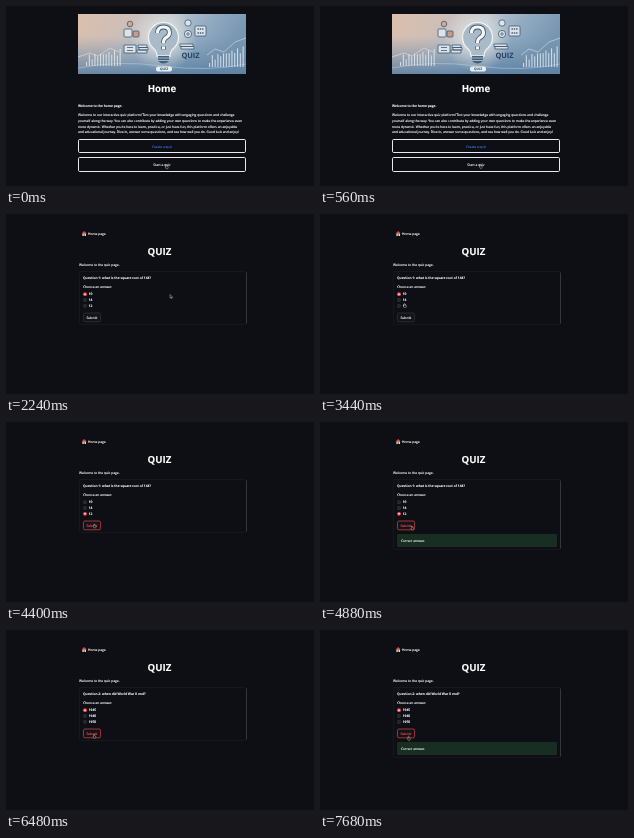
Recreate the animation shown at these times as an HTML page. Size 308 by 180 pixels, loop 8 s.

```html
<!DOCTYPE html>
<html lang="en">
<head>
<meta charset="utf-8">
<title>Quiz</title>
<style>
html, body { margin: 0; width: 100%; height: 100%; overflow: hidden; background: #0d0f14; }
svg { display: block; width: 100%; height: 100%; }
text { font: 500 3.3px "Open Sans", "Noto Sans", sans-serif; fill: #fff; stroke: #fff; stroke-width: .12; text-rendering: geometricPrecision; }
.title { font-size: 9.7px; font-weight: 700; text-anchor: middle; }
.bold { font-weight: 600; }
.mid { text-anchor: middle; }
.dark { fill: #24415f; stroke: none; font-weight: 700; }
</style>
</head>
<body>
<svg viewBox="0 0 308 180">
  <defs>
    <linearGradient id="sky" x2="1" y2=".25">
      <stop offset="0" stop-color="#dcbfad"/>
      <stop offset=".3" stop-color="#cdbfb8"/>
      <stop offset=".55" stop-color="#b7c3cd"/>
      <stop offset=".78" stop-color="#8fa9c0"/>
      <stop offset="1" stop-color="#7896b2"/>
    </linearGradient>
    <linearGradient id="haze" x2="0" y2="1">
      <stop offset="0" stop-color="#7391ad" stop-opacity="0"/>
      <stop offset="1" stop-color="#5b80a2" stop-opacity=".9"/>
    </linearGradient>
    <radialGradient id="glow">
      <stop offset="0" stop-color="#f4efe6" stop-opacity=".9"/>
      <stop offset="1" stop-color="#eee9e2" stop-opacity="0"/>
    </radialGradient>
    <clipPath id="frame"><rect x="72" y="8" width="168" height="60"/></clipPath>
  </defs>
  <rect width="308" height="180" fill="#0d0f14"/>

  <g id="home">
    <g clip-path="url(#frame)">
      <rect x="72" y="8" width="168" height="60" fill="url(#sky)"/>
      <rect x="72" y="30" width="168" height="38" fill="url(#haze)"/>
      <circle cx="157" cy="32" r="34" fill="url(#glow)"/>
      <g id="bars" fill="#e6edf2"></g>
      <path d="M72 51 L84 47 L92 50 L104 42 L113 46 M201 49 L209 43 L218 46 L229 36 L240 32" fill="none" stroke="#e9eef1" stroke-width=".5"/>
      <path d="M72 62 Q112 54 157 60 T240 58" fill="none" stroke="#d5e1ea" stroke-width=".4"/>
      <g fill="#dfe3e5" stroke="#3c5a78" stroke-width=".8">
        <circle cx="124" cy="18" r="2.8" fill="#d9a68c"/>
        <rect x="118" y="23" width="8" height="8" rx="1"/>
        <rect x="127" y="25" width="6" height="6" rx="1" fill="#c79c86"/>
        <path d="M118 39H130V47H118Z M121 41.5H127M121 44.5H127"/>
        <path d="M132 39H141V41.5H132ZM133 41.5H142V44H133ZM131 44H141V47H131Z"/>
        <circle cx="182" cy="17" r="3.2"/>
        <circle cx="182" cy="28" r="3.6"/><circle cx="182" cy="28" r="1.2"/>
        <rect x="189" y="20" width="11" height="10" rx="1"/>
        <path d="M174 38H187V40.5H174ZM175 40.5H188V43H175Z"/>
      </g>
      <path d="M191.5 23H197.5M191.5 27H197.5" stroke="#3c5a78" stroke-width="1.4" stroke-dasharray="1.4 .9"/>
      <path d="M151 50 Q151 45 147 42 A15 15 0 1 1 168 42 Q164 45 164 50 Z" fill="#a9bac8" stroke="#edf1f2" stroke-width="1.3"/>
      <path d="M152 50H163V55Q157.5 60 152 55Z" fill="#425f7c"/>
      <path d="M152 52H163M152 54.5H163" stroke="#d3dde4" stroke-width=".7"/>
      <g id="mark" fill="none">
        <path d="M151.5 27 Q151.5 21 157.5 21 Q163.5 21 163.5 26.5 Q163.5 30 159.5 32 Q157.5 33.2 157.5 37 M157.5 40.4V43.4" stroke="#3c5a78" stroke-width="4.8"/>
        <path d="M151.5 27 Q151.5 21 157.5 21 Q163.5 21 163.5 26.5 Q163.5 30 159.5 32 Q157.5 33.2 157.5 37 M157.5 40.6V43.2" stroke="#f7f6f1" stroke-width="3.2"/>
      </g>
      <text class="mid dark" x="184.5" y="51.5" style="font-size:7.4px">QUIZ</text>
      <rect x="150" y="60.5" width="16" height="5" rx="2" fill="#e8eef0"/>
      <text class="mid dark" x="158" y="64.2">QUIZ</text>
    </g>
    <text class="title" x="156" y="86.2">Home</text>
    <text class="bold" x="72" y="101">Welcome to the home page.</text>
    <g id="intro"></g>
    <g fill="none" stroke="#e8e9ea">
      <rect x="72.5" y="133.5" width="167" height="13" rx="1.2"/>
      <rect x="72.5" y="151.5" width="167" height="14" rx="1.2"/>
    </g>
    <text class="mid" x="156" y="141.6" style="fill:#3a72e0;stroke:#3a72e0">Create a quiz</text>
    <text class="mid" x="156" y="160">Start a quiz</text>
  </g>

  <g id="quiz">
    <path d="M76.4 19.3H80V22H76.4Z" fill="#eadccb"/>
    <path d="M75.6 19.6L78.2 17L80.8 19.6Z" fill="#c9503f"/>
    <path d="M77.7 20.3H78.8V22H77.7Z" fill="#7a4a34"/>
    <text x="82" y="20.9">Home page</text>
    <text class="title" x="153.5" y="40.8">QUIZ</text>
    <text x="73" y="52.2">Welcome to the quiz page.</text>
    <rect id="form" x="73.5" y="57.5" width="167" rx="1.8" fill="none" stroke="#16181d"/>
    <path id="edge" fill="none" stroke="#34363c"/>
    <text id="question" class="bold" x="77" y="65.2"></text>
    <text x="77" y="74.3">Choose an answer:</text>
    <g id="options"></g>
    <rect id="button" x="77.4" y="99" width="17.2" height="8.8" rx="1.5" fill="#12141a" stroke-width=".7"/>
    <text id="submit" class="mid" x="86" y="104.6">Submit</text>
    <g id="result">
      <rect x="77" y="112" width="160" height="13" rx="1.2" fill="#182e23"/>
      <text x="81" y="119.8" style="fill:#dffde9;stroke:#dffde9">Correct answer.</text>
    </g>
  </g>

  <g fill="#0a0a0a" stroke="#fff" stroke-width=".35">
    <path id="arrow" d="M0 0V3.6L.9 2.8L1.5 4.1L2.1 3.8L1.5 2.6H2.6Z"/>
    <path id="hand" d="M-.4 1.7V-.1Q0-.5.4-.1V1.3L1.7 1.7V2.9L1.2 3.8H-.3L-1.1 2.4Q-1 1.8-.4 2.3Z"/>
  </g>
</svg>
<script>
const LOOP = 8000, STEP = 80;
const $ = id => document.getElementById(id);
const show = (id, on) => $(id).setAttribute("display", on ? "inline" : "none");

// [time, x, y] of the pointer tip
const path = [
  [0, 160.5, 159], [560, 160.5, 158.5], [800, 160.5, 158.5],
  [1360, 164, 80.5], [2880, 164, 80.5], [3440, 84.5, 89.8],
  [3520, 84.5, 89.8], [3760, 79, 91], [4000, 79, 91],
  [4480, 89, 103], [4720, 92, 104], [5280, 92, 104.5],
  [5920, 92, 104.5], [6160, 87, 85], [6480, 88, 104.5],
  [6720, 89, 109], [6960, 89, 109], [7280, 88, 105], [7680, 88.5, 106.5], [LOOP, 88.5, 106.5]
];
const rounds = [
  { question: "Question 1: what is the square root of 144?", options: ["10", "14", "12"] },
  { question: "Question 2: when did World War II end?", options: ["1945", "1940", "1950"] }
];
const intro = [
  "Welcome to our interactive quiz platform! Test your knowledge with engaging questions and challenge",
  "yourself along the way. You can also contribute by adding your own questions to make the experience even",
  "more dynamic. Whether you're here to learn, practice, or just have fun, this platform offers an enjoyable",
  "and educational journey. Dive in, answer some questions, and see how well you do. Good luck and enjoy!"
];

$("intro").innerHTML = intro.map((line, i) =>
  `<text x="72" y="${109.9 + i * 5.85}">${line}</text>`).join("");

const chart = (left, count, base, rise) => Array.from({ length: count }, (_, i) => {
  const h = 4 + rise * i + 7 * Math.abs(Math.sin(i * 1.7));
  return `<rect x="${left + i * 2.8}" y="${base - h}" width="1.1" height="${h}" opacity=".8"/>`;
}).join("");
$("bars").innerHTML = chart(80, 13, 60, .5) + chart(203, 13, 61, .8);

$("options").innerHTML = [0, 1, 2].map(i => {
  const y = 80.2 + i * 5.8;
  return `<circle cx="79" cy="${y}" r="1.9"/><circle cx="79" cy="${y}" r=".75"/><text class="bold" x="82.7" y="${y + 1.2}"></text>`;
}).join("");
const rings = $("options").querySelectorAll("circle");
const labels = $("options").querySelectorAll("text");

function pointer(t) {
  const i = Math.max(1, path.findIndex(p => p[0] > t));
  const [t0, x0, y0] = path[i - 1], [t1, x1, y1] = path[i];
  const k = (t - t0) / (t1 - t0), e = k * k * (3 - 2 * k);
  return [x0 + (x1 - x0) * e, y0 + (y1 - y0) * e];
}

function draw(time) {
  const t = Math.floor(time % LOOP / STEP) * STEP;
  const second = t >= 5600;
  const answered = (t >= 4800 && t < 5600) || t >= 7440;
  const hover = (t >= 4400 && t < 6080) || t >= 6400;
  const selected = !second && t >= 3920 ? 2 : 0;
  const round = rounds[+second];
  const formHeight = answered ? 70 : 53;

  show("home", t < 640);
  show("quiz", t >= 2240);
  show("result", answered);
  $("form").setAttribute("height", formHeight);
  $("edge").setAttribute("d", `M240.5 58.5v${formHeight - 2}`);
  $("question").textContent = round.question;
  labels.forEach((label, i) => {
    label.textContent = round.options[i];
    rings[2 * i].setAttribute("fill", i === selected ? "#ff4b4b" : "#30343e");
    rings[2 * i + 1].setAttribute("fill", i === selected ? "#fff" : "#0d0f14");
  });
  const ink = hover ? "#ff4b4b" : "#fff";
  $("button").setAttribute("stroke", hover ? "#e34447" : "#34363c");
  $("submit").style.fill = $("submit").style.stroke = ink;

  const [x, y] = pointer(t);
  const clickable = t < 640 || (t >= 3440 && t < 4240) || hover;
  show("hand", clickable);
  show("arrow", !clickable);
  for (const id of ["hand", "arrow"]) $(id).setAttribute("transform", `translate(${x} ${y})`);
}

const start = performance.now();
function tick() {
  draw(performance.now() - start);
  requestAnimationFrame(tick);
}
tick();
</script>
</body>
</html>
```
